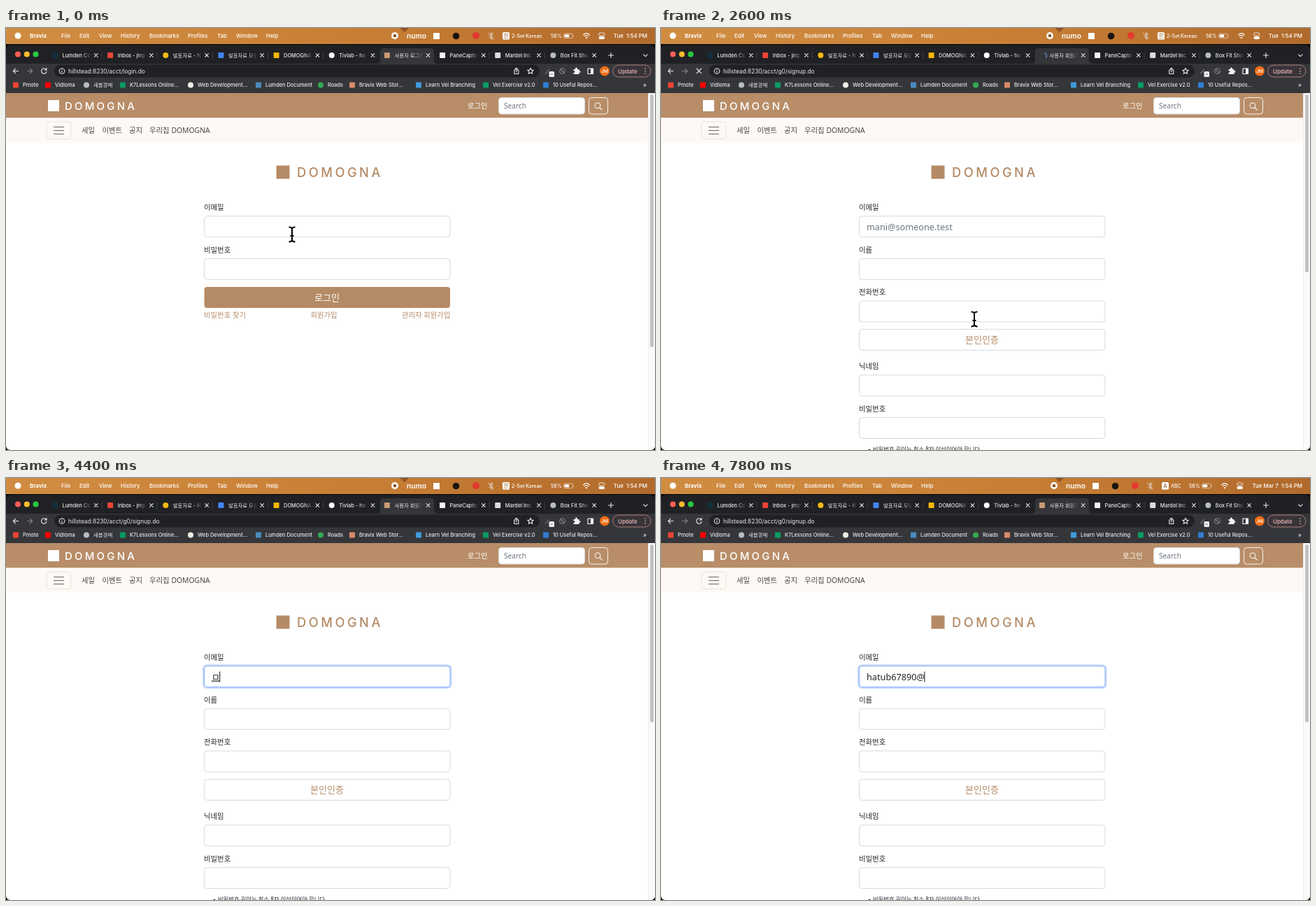
Animation, 928 px wide and 603 px high, one loop 8000 ms. Source, as an HTML page:

```html
<!DOCTYPE html>
<html lang="ko">
<head>
<meta charset="utf-8">
<title>Sign-up demo</title>
<style>
  html, body { margin: 0; width: 100%; height: 100%; overflow: hidden; background: #000; }
  svg { display: block; }
  text { white-space: pre; }
  .ui { font: 500 7.4px Inter, "Noto Sans CJK KR", sans-serif; fill: #e9eaed; }
  .menu { font-size: 7.9px; fill: #fff; }
  .site { font: 10.4px "Noto Sans", "Noto Sans CJK KR", sans-serif; fill: #212529; }
  .brand { font: 500 15px Inter, sans-serif; letter-spacing: 3.2px; fill: #fff; }
  .big { font-size: 18.3px; letter-spacing: 3.5px; fill: #b58b66; }
  .nav { font-weight: 500; fill: #4b4745; }
  .mid { text-anchor: middle; }
  .end { text-anchor: end; }
  .large { font-size: 13px; }
  .entry { font-size: 12.7px; }
  .tan { fill: #b58b66; }
  .white { fill: #fff; }
  .grey { fill: #6c757d; }
  .box { fill: #fff; stroke: #d6d9dd; }
  .line { fill: none; stroke: #e8eaed; stroke-width: 1.1; stroke-linecap: round; stroke-linejoin: round; }
  .dim { stroke: #85878b; }
  .focus { fill: #fff; stroke: #86aef8; }
  .ring { fill: none; stroke: #c2d8fd; stroke-width: 2.2; }
  .cursor { stroke: #fff; stroke-width: 1; stroke-linejoin: round; }
</style>
</head>
<body>
<svg width="928" height="603" viewBox="0 0 928 603">
  <defs>
    <linearGradient id="sky">
      <stop offset="0" stop-color="#d08d42"/><stop offset=".55" stop-color="#c87f35"/><stop offset="1" stop-color="#b06a2c"/>
    </linearGradient>
    <linearGradient id="fade"><stop offset="0" stop-color="#202124" stop-opacity="0"/><stop offset="1" stop-color="#202124"/></linearGradient>
    <linearGradient id="fadeOn"><stop offset="0" stop-color="#35363a" stop-opacity="0"/><stop offset="1" stop-color="#35363a"/></linearGradient>
    <clipPath id="win"><rect y="24" width="928" height="579" rx="6"/></clipPath>
    <path id="bar" d="M-4.500-10.500q3.500 0 4.500 2 1-2 4.500-2M-4.500 10.500q3.500 0 4.500-2 1 2 4.500 2M0-8.500v17M-2.500 2h5"/>
  </defs>

  <!-- menu bar -->
  <rect width="928" height="23" fill="url(#sky)"/>
  <path d="M563 0h13l-6 6z" fill="#8d5427"/>
  <circle cx="17" cy="11" r="4.5" fill="#fff"/>
  <g id="menus"></g>
  <g id="status">
    <circle cx="556" cy="11" r="5" fill="#fff"/><rect x="554" y="9" width="4" height="4" rx=".6" fill="#8d5427"/>
    <text class="ui menu" x="573" y="14.5" style="font-size:10.2px;font-weight:600">numo</text>
    <rect x="611" y="7" width="9" height="9" fill="#fff"/>
    <circle cx="643.5" cy="11.5" r="4.8" fill="#1a1410"/>
    <circle cx="672" cy="11" r="5" fill="#e5382f"/>
    <path class="line" d="M691 9l5 4.500-2.500 2.500V6.500L696 9l-5 4.500M689.500 7l7.500 9" stroke-width=".8" opacity=".65"/>
    <rect x="710" y="6" width="10" height="10.5" rx="1.5" fill="#fff"/>
    <text class="ui mid" id="keyIcon" x="715" y="14" style="font-size:7.5px;fill:#9b602c"></text>
    <text class="ui white" id="keyName" x="723" y="13.8" style="font-size:6.9px"></text>
  </g>
  <g id="power">
    <text class="ui white" x="779" y="13.8" style="font-size:7.1px">56%</text>
    <rect x="797.5" y="8" width="13" height="6.5" rx="2" fill="none" stroke="#fff" stroke-opacity=".7" stroke-width=".8"/>
    <rect x="798.7" y="9.2" width="6.5" height="4.1" rx="1" fill="#fff"/>
    <path d="M811.500 10v2.500q1.500-1.200 0-2.500" fill="#fff" opacity=".7"/>
    <path class="line" d="M825.500 9.800q4.500-4.200 9 0M827.200 11.800q2.800-2.600 5.600 0" style="stroke:#fff"/>
    <circle cx="830" cy="14" r="1.2" fill="#fff"/>
    <rect x="847.5" y="7" width="8.5" height="3.8" rx="1.9" fill="none" stroke="#fff" stroke-width=".8"/>
    <rect x="847.5" y="12" width="8.5" height="4" rx="2" fill="#fff"/>
  </g>
  <text class="ui menu end" id="clock" x="917" y="14"></text>

  <!-- browser -->
  <g clip-path="url(#win)">
    <rect y="24" width="928" height="28" fill="#202124"/>
    <rect y="51" width="928" height="42" fill="#35363a"/>
    <path d="M530 51q5 0 5-5V34q0-5 5-5h67q5 0 5 5v12q0 5 5 5z" fill="#35363a"/>
    <circle cx="17" cy="37.5" r="4" fill="#ff5f57"/><circle cx="29.8" cy="37.5" r="4" fill="#febc2e"/><circle cx="42.5" cy="37.5" r="4" fill="#28c840"/>
    <g id="tabs"></g>
    <path class="line" d="M861.500 39h7M865 35.500v7M911.500 37.800l2.800 2.800 2.800-2.800"/>

    <path class="line" d="M17.500 61.500h-7m3.200-3.300l-3.300 3.300 3.300 3.300"/>
    <path class="line dim" d="M30.500 61.500h7m-3.200-3.300l3.300 3.300-3.300 3.300"/>
    <path class="line" id="reload" d="M57.300 59.300a3.700 3.700 0 1 0 .6 3.200M58 57.300v2.700h-2.700"/>
    <path class="line" id="stop" d="M51 58l6.600 6.600M57.600 58l-6.600 6.600"/>
    <rect x="69" y="52.5" width="694" height="18" rx="9" fill="#202124"/>
    <circle class="line" cx="80" cy="61.5" r="3.8"/><path class="line" d="M80 61.300v2M80 59.500v.1"/>
    <text class="ui" id="url" x="89" y="64.5" style="font-size:8.3px;font-weight:400"></text>
    <path class="line" d="M728 60h-1.200v5.500h6V60h-1.200M729.800 63v-5.800m-1.800 1.700l1.800-1.800 1.800 1.800"/>
    <path class="line" d="M750 57.300l1.300 2.800 3 .3-2.300 2 .7 3-2.700-1.600-2.700 1.600.7-3-2.300-2 3-.3z"/>
    <path class="line dim" d="M771.500 65l5-5.500"/><rect x="776.5" y="62" width="7.5" height="8" rx="1.5" fill="#eef0f2"/><path d="M778.500 66h3.500" stroke="#777"/>
    <circle class="line dim" cx="795.5" cy="61.5" r="3.8"/><path class="line dim" d="M793 59l5 5"/>
    <path d="M811.500 59h2.500q-.5-2.500 1.500-2.500t1.500 2.500h2.500v2.200q2-.2 2 1.300t-2 1.300v2.200h-8v-2.300q2 0 2-1.300t-2-1.300z" fill="#f1f3f4"/>
    <rect class="line" x="832" y="58" width="7.5" height="7.5" style="stroke:#fff"/><path d="M836 58h4v7.500h-4z" fill="#fff"/>
    <circle cx="856" cy="61.5" r="7" fill="#ef6c14"/><text class="ui mid white" x="856" y="64" style="font-size:6.8px">JM</text>
    <rect x="867.5" y="53" width="54.5" height="17" rx="8.5" fill="#39343a" stroke="#b98683" stroke-width=".9"/>
    <text class="ui" x="875" y="64.5" style="font-size:8px;fill:#f2bcb7">Update</text>
    <path d="M914 58v.1m0 3.400v.1m0 3.400v.1" stroke="#f2bcb7" stroke-width="1.6" stroke-linecap="round"/>
    <g id="marks"></g>
    <text class="ui" x="911" y="84" style="font-size:8px">»</text>

    <!-- page -->
    <rect y="93" width="928" height="510" fill="#fff"/>
    <rect y="93" width="919" height="35.5" fill="#b88d68"/>
    <rect y="128.5" width="919" height="35.5" fill="#fff9f5"/>
    <path d="M918.500 93v510" stroke="#ececec"/><rect x="919" y="93" width="9" height="510" fill="#fafafa"/>
    <rect id="thumb" x="921" y="95" width="5" rx="2.5" fill="#c1c1c1"/>
    <rect x="60" y="103" width="16" height="16" fill="#fff"/>
    <text class="brand" x="84" y="116.5">DOMOGNA</text>
    <text class="site white" x="660" y="115">로그인</text>
    <rect class="box" x="704.5" y="99.5" width="123" height="23.5" rx="4"/>
    <text class="site grey" x="712" y="115" style="font-size:10.1px">Search</text>
    <rect x="833.5" y="99.5" width="27" height="23.5" rx="4" fill="none" stroke="#fff" stroke-width=".9"/>
    <circle cx="846" cy="110.8" r="4" fill="none" stroke="#fff"/><path d="M849 113.800l3.500 3.500" stroke="#fff" stroke-width="1.2"/>
    <rect x="58" y="134" width="35" height="24.5" rx="4" fill="none" stroke="#e9e2dd"/>
    <path d="M68 141.500h15M68 146.500h15M68 151.500h15" stroke="#6b6663"/>
    <g id="navs"></g>
    <rect x="386.5" y="196.5" width="19" height="19" fill="#b58b66"/>
    <text class="brand big" x="416" y="213">DOMOGNA</text>
    <g id="login"></g>
    <g id="signup"></g>
    <g id="focus">
      <rect class="ring" x="282.2" y="267.5" width="354.1" height="32.5" rx="5"/>
      <rect class="focus" x="283.5" y="268.8" width="351.5" height="29.9" rx="4"/>
    </g>
    <text class="site entry grey" id="hint" x="294" y="288.5">mani@someone.test</text>
    <text class="site entry" id="entry" x="294" y="288.5"></text>
    <rect id="caret" y="276.5" width="1" height="15" fill="#111"/>
    <g id="popup">
      <path d="M354 305.500l5.500-5.500 5.500 5.500z" fill="#25292d"/>
      <rect x="346" y="305" width="121" height="101.5" rx="2.5" fill="#25292d"/>
      <path d="M346 378.500h121" stroke="#353a3e"/>
      <g id="mails"></g>
      <circle cx="358.5" cy="392.5" r="4" fill="#8d9195"/>
      <text class="ui" x="371" y="395.3" style="font-size:7.9px;font-weight:400;fill:#9a9fa4">Manage...</text>
    </g>
  </g>

  <g id="beam" fill="none">
    <use href="#bar" stroke="#fff" stroke-width="3.8"/><use href="#bar" stroke="#000" stroke-width="2"/>
  </g>
  <path id="arrow" class="cursor" d="M0 0v17.500l4-3.700 3 6.700 3.200-1.400-3-6.500h5.600z"/>
  <path id="hand" class="cursor" d="M-2 0q2-2 3.500 0v7l7 1.500q2 .5 1.500 3l-1 6.500H-1l-5-7q0-2 2-1.500l2 2z"/>
</svg>

<script>
const $ = id => document.getElementById(id);
const text = (cls, x, y, s, style = "") => `<text class="${cls}" x="${x}" y="${y}" style="${style}">${s}</text>`;
const icon = (x, y, color, round) =>
  `<rect x="${x - 4}" y="${y - 4}" width="8" height="8" rx="${round ? 4 : 1}" fill="${color}"/>`;

$("menus").innerHTML = [[34, "Bravix"], [79, "File"], [105, "Edit"], [133, "View"], [164, "History"],
  [205, "Bookmarks"], [260, "Profiles"], [302, "Tab"], [329, "Window"], [372, "Help"]]
  .map(([x, s], i) => text("ui menu", x, 14, s, i ? "" : "font-weight:700")).join("");

const ACTIVE = 6;
$("tabs").innerHTML = [["Lumden Code", "#12303f"], ["Inbox - jmpa", "#ea4335"], ["발표자료 - N", "#f5b912", 1],
  ["발표자료 모음", "#4285f4"], ["DOMOGNA", "#f6b704"], ["Tivlab - ho", "#fff", 1], ["", "#c99a74"],
  ["PaneCapto", "#f4f4f4"], ["Mardel Inc.", "#dcdcdc"], ["Box Fit Shop", "#b9bcc0", 1]]
  .map(([s, color, round], i) => {
    const x = 70 + i * 79.15, on = i === ACTIVE;
    const rule = i < 9 && !on && i !== ACTIVE - 1 ? `<path d="M${x + 67} 34v10" stroke="#4a4c50" stroke-width=".7"/>` : "";
    return `<g${on ? ' id="favicon"' : ""}>${icon(x, 39, color, round)}</g>
      <svg x="${x + 10.5}" y="28" width="40" height="22"><text class="ui" ${on ? 'id="title"' : ""} y="14">${s}</text></svg>
      <rect x="${x + 39}" y="30" width="13" height="18" fill="url(#${on ? "fadeOn" : "fade"})"/>
      <path class="line" d="M${x + 56.5} 36.700l4.600 4.600m0-4.600l-4.600 4.600"/>${rule}`;
  }).join("") + '<path class="line" id="spinner" d="M549 35.500q4 3 1.500 7" style="stroke:#7198d8"/>';

$("marks").innerHTML = [[14, "Pmote", "#ea4335"], [60, "Vidloma", "#f00"], [115, "새봄경매", "#b9bcc0", 1],
  [167, "K7Lessons Online...", "#0a9b63"], [264, "Web Development...", "#f0ede6", 1], [361, "Lumden Document", "#4b8bbe"],
  [450, "Roads", "#34a853", 1], [495, "Bravix Web Stor...", "#d98a6a"], [590, "Learn Vel Branching", "#3f9bdc"],
  [686, "Vel Exercise v2.0", "#0a9b63"], [772, "10 Useful Repos...", "#2f7fd0"]]
  .map(([x, s, color, round]) => icon(x, 81.5, color, round) + text("ui", x + 10, 84.2, s)).join("");

$("navs").innerHTML = [[108, "세일"], [137.5, "이벤트"], [176, "공지"], [205, "우리집 DOMOGNA"]]
  .map(([x, s]) => text("site nav", x, 150.3, s)).join("");

const box = (y, cls = "box") => `<rect class="${cls}" x="283.5" y="${y}" width="351.5" height="29.9" rx="4"/>`;
const field = (label, y) => text("site", 283, y - 8.8, label) + box(y);

$("login").innerHTML = field("이메일", 268.8) + field("비밀번호", 329.4) + box(370, "tan") +
  text("site large white mid", 459, 389.5, "로그인") + text("site tan", 283, 413.8, "비밀번호 찾기") +
  text("site tan mid", 454.5, 413.8, "회원가입") + text("site tan end", 635.5, 413.8, "관리자 회원가입");

$("signup").innerHTML = field("이메일", 268.8) + field("이름", 329.4) + field("전화번호", 390) + box(430.5) +
  text("site large tan mid", 459, 450.2, "본인인증") + field("닉네임", 496) + field("비밀번호", 556.6) +
  '<circle cx="298" cy="603" r="1.3"/>' +
  text("site", 303, 605, "비밀번호 길이는 최소 8자 이상이어야 합니다.", "font-size:8.3px");

$("mails").innerHTML = ["dwnam37@foma.test", "sumin4@foma.test", "dongwoong.nam@kvet.test"]
  .map((s, i) => text("ui white", 353.5, 321.7 + i * 22.7, s, "font-size:7.7px")).join("");

// Timelines: [start, value...]
const pointer = [[0, "beam", 409, 295], [1600, "beam", 440, 292], [1800, "arrow", 490, 312], [2000, "arrow", 474, 365],
  [2200, "hand", 452, 409], [2400, "hand", 448, 416], [2600, "beam", 448, 416], [2800, "beam", 444, 405],
  [3000, "beam", 420, 340], [3200, "beam", 403, 302], [4000, ""], [5200, "arrow", 442, 318], [5400, "beam", 444, 352], [5600, ""]];
const typed = [[0, ""], [4000, "ㅁ"], [4800, ""], [5600, "ha"], [5800, "hatu"], [6000, "hatub"],
  [6400, "hatub67"], [6600, "hatub6789"], [6800, "hatub67890"], [7200, "hatub67890@"]];
const caret = [[0, 0], [200, 1], [800, 0], [1200, 1], [1600, 0], [3200, 1], [3800, 0], [4000, 1],
  [5200, 0], [5600, 1], [7600, 0], [7800, 1]];
const at = (line, t) => line.filter(k => k[0] <= t).pop();
const show = (id, on) => { $(id).style.display = on ? "" : "none"; };
const put = (id, s) => { if ($(id).textContent !== s) $(id).textContent = s; };

function draw(t) {
  const joined = t >= 2600, loading = t >= 2400 && t < 2800, abc = t >= 5200;
  show("login", !joined);
  show("signup", joined);
  show("reload", !loading);
  show("stop", loading);
  show("favicon", !loading);
  show("spinner", loading);
  show("focus", t >= 200 && !joined || t >= 3200);
  show("popup", t >= 3400 && t < 4000);
  $("thumb").setAttribute("height", joined ? 254 : 361);
  put("title", joined ? "사용자 회원가입" : "사용자 로그인");
  put("url", "hillstead:8230/acct/" + (joined ? "g0/signup.do" : "login.do"));

  put("keyIcon", abc ? "A" : "한");
  put("keyName", abc ? "ABC" : "2-Set Korean");
  put("clock", abc ? "Tue Mar 7  1:54 PM" : "Tue  1:54 PM");
  $("status").setAttribute("transform", `translate(${abc ? 6 : 0})`);
  $("power").setAttribute("transform", `translate(${abc ? -24 : 0})`);

  const value = at(typed, t)[1];
  put("entry", value);
  $("entry").style.textDecoration = value === "ㅁ" ? "underline" : "none";
  show("hint", joined && !value);
  show("caret", at(caret, t)[1]);
  $("caret").setAttribute("x", 293.5 + (value ? $("entry").getComputedTextLength() : 0));

  const [, kind, x, y] = at(pointer, t);
  for (const id of ["beam", "arrow", "hand"]) show(id, id === kind);
  if (kind) $(kind).setAttribute("transform", `translate(${x} ${y})`);
}

function tick() {
  draw(Math.floor(performance.now() % 8000 / 200) * 200);
  requestAnimationFrame(tick);
}
tick();
</script>
</body>
</html>
```
